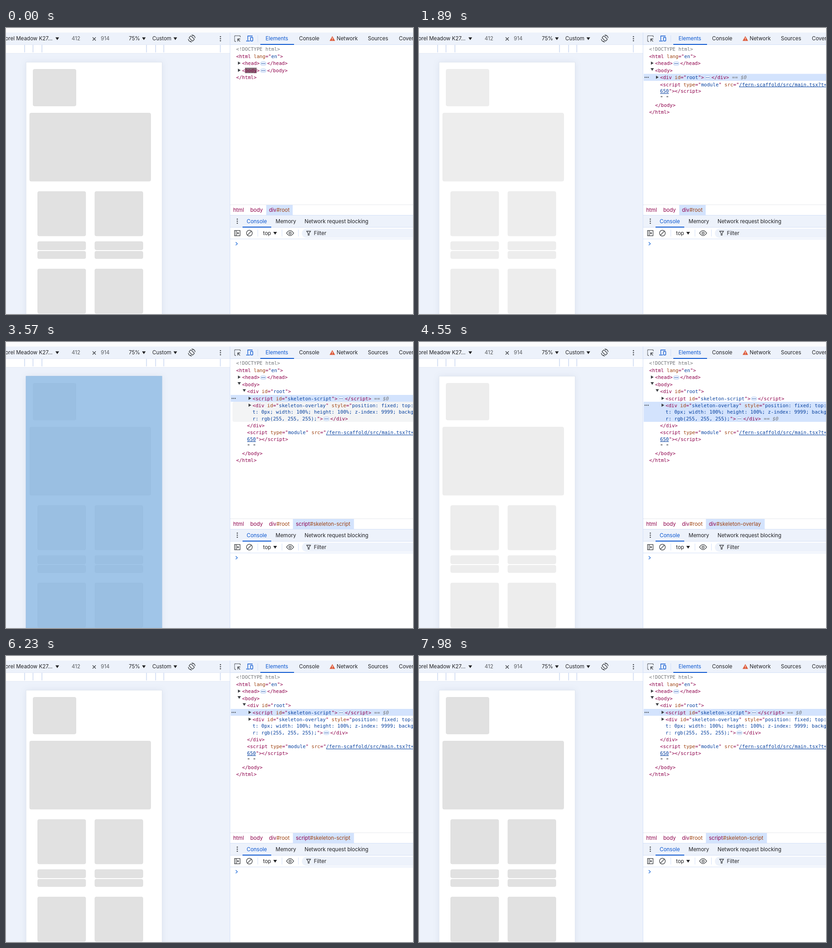
Write an HTML page that moves like this. It is 893 px wide and 627 px high and loops after 8000 ms.

```html
<!DOCTYPE html>
<html lang="en">
<head>
<meta charset="utf-8">
<title>Inspector</title>
<style>
html, body { margin: 0; width: 100%; height: 100%; overflow: hidden; background: #fff; }
svg { display: block; }
text { white-space: pre; font: 11.5px Inter, Roboto, sans-serif; fill: #202124; }
#tree text { font: 10.66px "DejaVu Sans Mono", monospace; }
.line { fill: none; stroke: #3c3f43; stroke-width: 1.3; }
#tree .tag, .tag { fill: #8e004b; }
#tree .attr, .attr { fill: #9f4312; }
#tree .val { fill: #0842a0; }
#tree .link { fill: #0842a0; text-decoration: underline; }
#tree .dim { fill: #74777a; }
#tree .ref { fill: #74777a; font-style: italic; }
.blue { fill: #0b57d0; }
</style>
</head>
<body>
<svg id="stage" width="893" height="627" viewBox="0 0 893 627"></svg>
<script>
const LOOP = 8000;
const BAR = '#edf2fb', RULE = '#d3e0f8', PICK = '#d3e3fd';
const CHAR = 6.42;

// Moments at which the picture changes, in ms
const AT = {
  flashEnd: 840, lighter: 1260, openBody: 1610, openRoot: 2380,
  hoverScript: 2800, pickScript: 3220, hoverOverlay: 3570,
  pickOverlay: 3780, leave: 4550, repick: 5110, darker: 6230
};

const esc = s => s.replace(/&/g, '&amp;').replace(/</g, '&lt;');
const rect = (x, y, w, h, fill, more = '') =>
  `<rect x="${x}" y="${y}" width="${w}" height="${h}" fill="${fill}" ${more}/>`;
const text = (x, y, s, cls = '', more = '') =>
  `<text x="${x}" y="${y}" class="${cls}" ${more}>${esc(s)}</text>`;
const path = (d, more = 'class="line"') => `<path d="${d}" ${more}/>`;
const dot = (x, y, r, fill) => `<circle cx="${x}" cy="${y}" r="${r}" fill="${fill}"/>`;
const dots = (x, y) => [-4.5, 0, 4.5].map(d => dot(x, y + d, 1.3, '#3c3f43')).join('');
const down = (x, y) => path(`M${x - 4} ${y - 3}h8l-4 6z`, 'fill="#202124"');
const split = (x, y) => rect(x, y, 1, 15, RULE);

function deviceBar() {
  return rect(0, 0, 893, 10, '#fcfcfd') + rect(0, 10, 893, 26, BAR) +
    rect(0, 36, 491, 591, BAR) + rect(0, 36.5, 491, 18.5, '#fff') +
    rect(0, 36, 491, 1, '#e1e8f5') + rect(0, 55, 491, 1, '#e3e9f5') +
    [40, 58.5, 78, 307.5, 327.5, 345.5, 469.5].map(x => rect(x, 37, 1.6, 16.5, '#cddaf2')).join('') +
    text(102, 27.3, 'Lunorel Meadow K27...', '', 'text-anchor="end"') + down(112.5, 23.5) +
    text(144, 27.3, '412', '', 'style="fill:#5a5d61"') +
    path('M190 20.5l7 7m0-7l-7 7') +
    text(208, 27.3, '914', '', 'style="fill:#5a5d61"') +
    text(269.5, 27.3, '75%') + down(302.5, 23.5) +
    text(321, 27.3, 'Custom') + down(371.5, 23.5) +
    `<g transform="translate(407.5 23)" class="line">
      <rect x="-3" y="-5.5" width="6" height="11" rx="1" transform="rotate(-45)"/>
      <path d="M-7.5 1A7.5 7.5 0 0 0-1 7.5l-2-2M7.5-1A7.5 7.5 0 0 0 1-7.5l2 2"/></g>` +
    dots(470.5, 23.5);
}

function panelBars() {
  return rect(492, 36, 401, 591, '#fff') + rect(492, 36, 401, 1, RULE) +
    path('M514 20v-3h-12.5v12.5h4', 'class="line" stroke-dasharray="2 1.2"') +
    path('M513.5 29.5l-5-5m0 5v-5.5h5.5') +
    path('M530.5 27v-9.5h10.5M527 28.5h8', 'class="line" style="stroke:#0b57d0"') +
    rect(536.5, 20.5, 5, 8, 'none', 'class="line" style="stroke:#0b57d0" rx="1"') +
    split(552, 16) +
    text(569.5, 27.3, 'Elements', 'blue') + rect(558, 35, 74, 2, '#0b57d0') +
    text(643, 27.3, 'Console') +
    path('M716 17.8l6 10.4h-12z', 'fill="#dd5837"') + rect(715.4, 21, 1.2, 3.6, '#fff') + rect(715.4, 25.6, 1.2, 1.2, '#fff') +
    text(725.5, 27.3, 'Network') + text(794, 27.3, 'Sources') + text(862, 27.3, 'Coverage') +
    rect(491, 10, 1, 617, RULE) +
    path('M492 387.5h401', 'stroke="#cfd3da" stroke-dasharray="1 1"') +
    rect(492, 410, 401, 27, BAR) + rect(492, 410, 401, 1, RULE) + rect(492, 436.5, 401, 1, RULE) +
    dots(507.5, 423.5) +
    text(528, 427.8, 'Console', 'blue') + rect(519, 435.5, 63, 2, '#0b57d0') +
    text(591.5, 427.8, 'Memory') + text(655, 427.8, 'Network request blocking') +
    rect(492, 462, 401, 1, RULE) +
    rect(501.5, 444, 12, 11.5, 'none', 'class="line"') + path('M505 444v11.5') + path('M507.5 447l4 2.8-4 2.8z', 'fill="#3c3f43"') +
    '<circle cx="534" cy="449.7" r="6.4" class="line"/>' + path('M529.5 454.2l9-9') +
    split(552, 442) + text(564, 453.8, 'top') + down(590.5, 450) + split(605, 442) +
    path('M615.5 449.7q7.8-11 15.6 0q-7.8 11-15.6 0z') + '<circle cx="623.3" cy="449.7" r="2.4" class="line"/>' +
    split(641, 442) + rect(649, 440, 260, 20, BAR, 'rx="10"') +
    path('M659.7 445.5h8.6l-3.2 4.6v4h-2.2v-4z') + text(675.5, 453.8, 'Filter') +
    path('M504 469.5l3.7 3.4-3.7 3.4', 'fill="none" stroke="#2f77dc" stroke-width="1.4"');
}

function phone(t) {
  const light = t >= AT.lighter && t < AT.darker;
  const fill = light ? '#ededed' : '#e1e1e1', edge = light ? '#e9e9e9' : '#dadada';
  const block = (x, y, w, h) => rect(x, y, w, h, fill, `rx="3" stroke="${edge}" stroke-width=".8"`);
  let out = rect(44, 75, 298.5, 570, '#fff', 'stroke="#dfe5ef" style="filter:drop-shadow(0 0 7px rgba(40,60,100,.08))"') +
    block(59.5, 90.5, 94, 80.5) + block(52, 186.5, 265.5, 149.3);
  for (const x of [69.5, 195])
    for (const [y, h] of [[358.5, 97.3], [468.3, 18], [489.6, 16], [528.3, 97.3]])
      out += block(x, y, 105.3, h);
  if (t >= AT.hoverOverlay && t < AT.leave)
    out += rect(43.5, 74.5, 299, 553, 'rgba(111,168,220,.66)');
  return out;
}

function pill(x, y) {
  return rect(x + 1.8, y - 3.3, 12.4, 8, '#f3f7fe', 'rx="4" stroke="#b3ccf3"') +
    [5, 8, 11].map(d => dot(x + d, y + .7, .9, '#0842a0')).join('');
}

// Tokens are [class, string]; "pill" stands for folded content
function line(x, y, ...tokens) {
  let out = '';
  for (const [cls, s] of tokens) {
    if (cls === 'pill') { out += pill(x, y); x += 16.5; }
    else { out += text(x, y + 3.9, s, cls); x += s.length * CHAR; }
  }
  return out;
}

const tag = s => ['tag', s], val = s => ['val', s];
const attr = (name, value, end = '"') => [['attr', ` ${name}`], tag('="'), val(value), tag(end)];
const PILL = ['pill'], REF = ['ref', ' == $0'];

function arrow(x, y, turn) {
  return `<path d="M-2.8-3.6L3 0L-2.8 3.6z" fill="#3c3f43" transform="translate(${x} ${y - 1.8 * turn}) rotate(${90 * turn})"/>`;
}
const turned = (t, start) => Math.min(1, Math.max(0, (t - start) / 150));

function selection(t) {
  if (t < AT.pickScript) return 'root';
  return t >= AT.pickOverlay && t < AT.repick ? 'overlay' : 'script';
}

function tree(t) {
  const body = t >= AT.openBody, root = t >= AT.openRoot, pick = selection(t);
  const rows = { root: [100.5, 15.3], script: [116, 15], overlay: [131, 44] };
  const ref = name => pick === name ? [REF] : [];
  let out = '';

  const hover = t >= AT.hoverScript && t < AT.pickScript ? 'script' :
    t >= AT.hoverOverlay && t < AT.leave ? 'overlay' : '';
  if (hover) out += rect(497, rows[hover][0], 410, rows[hover][1], '#f3f4f5', 'rx="4"');
  if (body) {
    const [y, h] = rows[pick];
    out += rect(493, y, 400, h, PICK) +
      [496, 499.5, 503].map(x => dot(x, y + 7.7, 1.1, '#3c3f43')).join('');
  }
  if (t < AT.flashEnd)
    out += rect(524.3, 87, 25.7, 12, '#846f78', `opacity="${1 - t / AT.flashEnd}"`);

  out += line(505, 46.5, ['dim', '<!DOCTYPE html>']) +
    line(505, 62, tag('<html'), ...attr('lang', 'en', '">')) +
    arrow(511.7, 77, 0) + line(518, 77.3, tag('<head>'), PILL, tag('</head>')) +
    arrow(511.7, 92.7, turned(t, AT.openBody));
  if (!body)
    return out + line(518, 92.8, tag('<body>'), PILL, tag('</body>')) + line(505, 108, tag('</html>'));

  out += line(518, 92.8, tag('<body>')) + arrow(522.8, 108, turned(t, AT.openRoot)) +
    line(529, 108, tag('<div'), ...attr('id', 'root', '">'), ...(root ? [] : [PILL, tag('</div>')]), ...ref('root'));
  if (root)
    out += arrow(535, 123.5, 0) +
      line(541, 123.7, tag('<script'), ...attr('id', 'skeleton-script', '">'), PILL, tag('<\/script>'), ...ref('script')) +
      arrow(535, 138.5, 0) +
      line(541, 138.6, tag('<div'), ...attr('id', 'skeleton-overlay'), ...attr('style', 'position: fixed; top:', '')) +
      line(541, 153.2, val('t: 0px; width: 100%; height: 100%; z-index: 9999; backg')) +
      line(541, 167.8, val('r: rgb(255, 255, 255);'), tag('">'), PILL, tag('</div>'), ...ref('overlay')) +
      line(529, 183, tag('</div>'));

  const y = root ? 198.4 : 123.7;
  return out +
    line(529, y, tag('<script'), ...attr('type', 'module'), ['attr', ' src'], tag('="'), ['link', '/fern-scaffold/src/main.tsx?t=']) +
    line(529, y + 14.6, ['link', '650'], tag('"><\/script>')) +
    line(529, y + 29.6, ['', '" "']) +
    line(518, y + 45.3, tag('</body>')) + line(505, y + 60.6, tag('</html>'));
}

function crumbs(t) {
  const pick = selection(t);
  const crumb = (x, name, id = '') =>
    `<text x="${x}" y="403.2" class="tag">${name}<tspan class="attr">${id}</tspan></text>`;
  const [x, w] = { root: [571, 58], script: [629.5, 134], overlay: [629.5, 129] }[pick];
  return rect(x, 388, w, 22, PICK) + crumb(498.5, 'html') + crumb(536, 'body') + crumb(577, 'div', '#root') +
    (pick === 'root' ? '' : crumb(636, pick === 'script' ? 'script' : 'div', '#skeleton-' + pick));
}

const stage = document.getElementById('stage');
stage.innerHTML = deviceBar() + '<g id="phone"></g>' + panelBars() + '<g id="tree"></g><g id="crumbs"></g>';
const layers = Object.entries({ phone, tree, crumbs })
  .map(([id, draw]) => ({ node: document.getElementById(id), draw, last: '' }));

function frame(now) {
  const t = now % LOOP;
  for (const layer of layers) {
    const markup = layer.draw(t);
    if (markup !== layer.last) layer.node.innerHTML = layer.last = markup;
  }
  requestAnimationFrame(frame);
}
frame(0);
</script>
</body>
</html>
```
